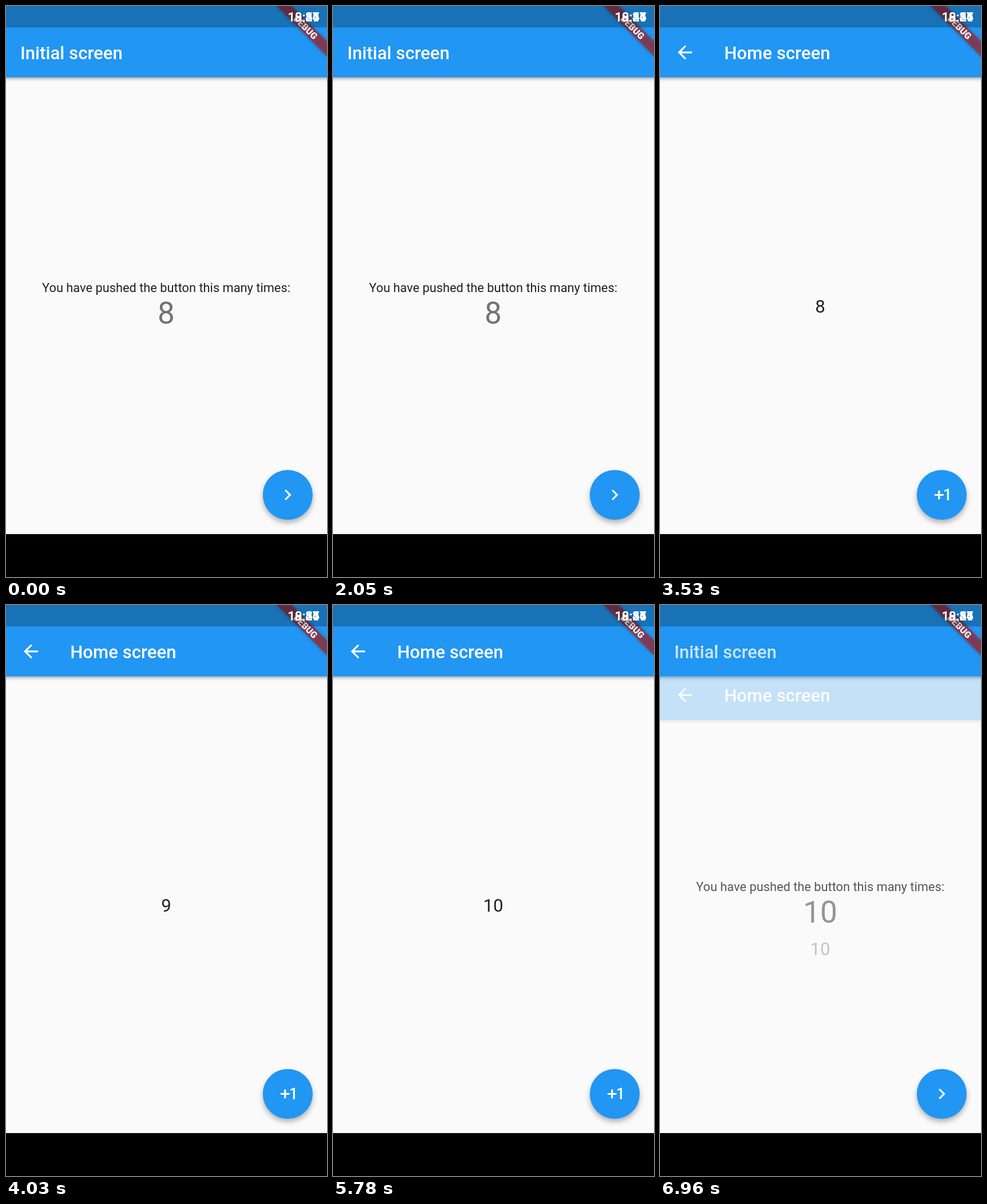
An HTML page that plays this animation: 561x998 px, repeating every 8000 ms.

```html
<!DOCTYPE html>
<html lang="en">
<head>
<meta charset="utf-8">
<title>Counter app</title>
<style>
  html, body { margin: 0; height: 100%; overflow: hidden; background: #000; }
  svg { display: block; width: 100vw; height: 100vh; font-family: Roboto, sans-serif; }
  .surface { fill: #fafafa; }
  .bar { fill: #2196f3; filter: drop-shadow(0 2px 3px rgba(0, 0, 0, .38)); }
  .fab { fill: #2196f3; filter: drop-shadow(0 5px 5px rgba(0, 0, 0, .3)); }
  .title { font-size: 31.16px; font-weight: 500; fill: #fff; }
  .centered { text-anchor: middle; }
  .label { font-size: 21.8px; fill: rgba(0, 0, 0, .87); }
  .big { font-size: 53px; fill: rgba(0, 0, 0, .54); }
  .small { font-size: 31.16px; fill: rgba(0, 0, 0, .87); }
  .icon { fill: #fff; }
  .clock { font-size: 21.8px; font-weight: 500; fill: #fff; text-anchor: end; }
  .debug { font-size: 15.9px; font-weight: 900; fill: #fff; text-anchor: middle; }
</style>
</head>
<body>
<svg viewBox="0 0 561 998">
  <defs><clipPath id="fabClip"><circle cx="492.4" cy="854.5" r="43.6"/></clipPath></defs>

  <g id="initial">
    <rect class="surface" width="561" height="923"/>
    <rect class="bar" x="-20" y="-20" width="601" height="144.7"/>
    <text class="title" x="25" y="92.8">Initial screen</text>
    <text class="label centered" x="280" y="500.3">You have pushed the button this many times:</text>
    <text class="big centered count" x="280" y="554.8"></text>
  </g>

  <g id="home">
    <rect class="surface" width="561" height="923"/>
    <rect class="bar" x="-20" width="601" height="124.7"/>
    <path class="icon" transform="translate(24.9 62.4) scale(1.558)"
      d="M20 11H7.83l5.59-5.59L12 4l-8 8 8 8 1.41-1.41L7.83 13H20z"/>
    <text class="title" x="112.2" y="92.8">Home screen</text>
    <text class="small centered count" x="280" y="535.8"></text>
  </g>

  <circle class="fab" cx="492.4" cy="854.5" r="43.6"/>
  <circle id="splash" cx="492.4" cy="854.5" fill="#fff" clip-path="url(#fabClip)"/>
  <g class="icon" transform="translate(473.7 835.8) scale(1.558)">
    <path id="next" d="M10 6L8.59 7.41 13.17 12l-4.58 4.59L10 18l6-6z"/>
    <path id="plusOne" d="M10 7H8v4H4v2h4v4h2v-4h4v-2h-4zM20 18h-2V7.38L15 8.4V6.7L19.7 5h.3z"/>
  </g>

  <g transform="translate(561 0) rotate(45)">
    <rect x="-62.3" y="43.6" width="124.6" height="18.7" fill="#b71c1c" fill-opacity=".63"
      style="filter: drop-shadow(0 0 3px rgba(0, 0, 0, .4))"/>
    <text class="debug" y="58.6">DEBUG</text>
  </g>
  <rect width="561" height="37.4" fill-opacity=".25"/>
  <g id="clock"></g>
  <rect y="923" width="561" height="75"/>
</svg>

<script>
const LOOP = 8000;
const SLIDE = 231;
const $ = id => document.getElementById(id);

// Held steps: [start time, value]
const PAGE = [[0, 0], [2420, .583], [2460, .717], [2500, .85], [3530, 1],
              [6710, .9], [6920, .565], [6960, .43]];
const COUNT = [[0, 8], [3950, 9], [5650, 10]];
const SPLASH = [[0, 0], [3660, .35], [3720, .75], [3950, 1], [4030, 0],
                [5290, .6], [5650, 1], [5780, 0]];

const valueAt = (steps, time) => steps.findLast(([start]) => start <= time)[1];

function cubic(x1, y1, x2, y2) {
  const axis = (a, b, s) => 3 * a * s * (1 - s) ** 2 + 3 * b * s * s * (1 - s) + s ** 3;
  return x => {
    let low = 0, high = 1;
    for (let i = 0; i < 24; i++) {
      const mid = (low + high) / 2;
      if (axis(x1, x2, mid) < x) low = mid; else high = mid;
    }
    return axis(y1, y2, high);
  };
}
const slideEase = cubic(.4, 0, .2, 1);
const fadeEase = cubic(.42, 0, 1, 1);

// The clock digits pile up on each other.
$('clock').innerHTML = ['18:37', '10:24', '19:51', '18:46']
  .map(time => `<text class="clock" x="548" y="27">${time}</text>`).join('');

function draw(time) {
  const page = valueAt(PAGE, time);
  $('home').setAttribute('opacity', page ? fadeEase(page) : 0);
  $('home').setAttribute('transform', `translate(0 ${SLIDE * (1 - slideEase(page))})`);

  const count = valueAt(COUNT, time);
  document.querySelectorAll('.count').forEach(text => text.textContent = count);

  const onHome = time >= 2420 && time < 6710;
  $('plusOne').setAttribute('opacity', onHome ? 1 : 0);
  $('next').setAttribute('opacity', onHome ? 0 : 1);

  const splash = valueAt(SPLASH, time);
  $('splash').setAttribute('r', 44 * splash);
  $('splash').setAttribute('opacity', .2);
}

function tick() {
  draw(performance.now() % LOOP);
  requestAnimationFrame(tick);
}
tick();
</script>
</body>
</html>
```
